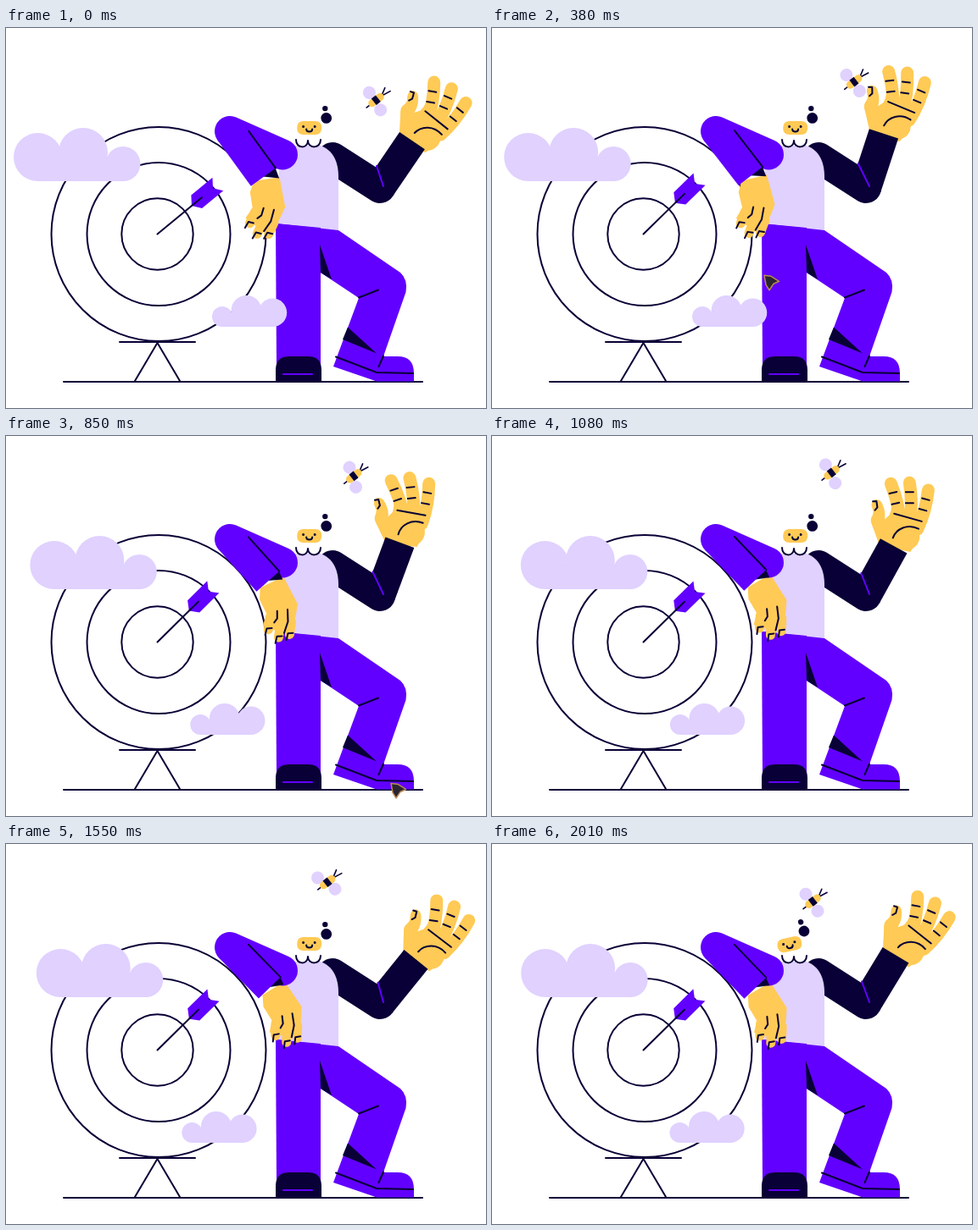
Animation, 566 px wide and 449 px high, one loop 2.08 s. Source, as an HTML page with a canvas:

```html
<!DOCTYPE html>
<html lang="en">
<head>
<meta charset="utf-8">
<title>Bullseye</title>
<style>
html, body { margin: 0; width: 100%; height: 100%; overflow: hidden; background: #fff; }
canvas { display: block; }
</style>
</head>
<body>
<canvas id="stage" width="566" height="449"></canvas>
<script>
const ctx = document.getElementById('stage').getContext('2d');
const INK = '#080036', VIOLET = '#6200ff', LILAC = '#e0d1ff', SKIN = '#ffca55', WHITE = '#fff';
const LOOP = 2080, STEP = 77.5, RAD = Math.PI / 180;

// Sine easing through turning points: time, value, time, value...
function sway(t, ...p) {
  let i = 0;
  while (i < p.length - 4 && t > p[i + 2]) i += 2;
  const u = Math.min(1, Math.max(0, (t - p[i]) / (p[i + 2] - p[i])));
  return p[i + 1] + (p[i + 3] - p[i + 1]) * (1 - Math.cos(Math.PI * u)) / 2;
}
// Parabola with its low point at t0 and its own strength on each side
function bow(t, t0, before, after) {
  const s = (t - t0) / 1000;
  return s * s * (s < 0 ? before : after);
}

function path(pts, close) {
  ctx.beginPath();
  for (let i = 0; i < pts.length; i += 2) ctx.lineTo(pts[i], pts[i + 1]);
  if (close) ctx.closePath();
}
function line(pts, color = INK, width = 2, cap = 'round') {
  path(pts);
  ctx.strokeStyle = color;
  ctx.lineWidth = width;
  ctx.lineCap = cap;
  ctx.lineJoin = 'round';
  ctx.stroke();
}
function poly(pts, color) {
  path(pts, true);
  ctx.fillStyle = color;
  ctx.fill();
}
function shape(d, fill, stroke, width = 2) {
  const p = new Path2D(d);
  if (fill) { ctx.fillStyle = fill; ctx.fill(p); }
  if (stroke) {
    ctx.strokeStyle = stroke;
    ctx.lineWidth = width;
    ctx.lineCap = ctx.lineJoin = 'round';
    ctx.stroke(p);
  }
}
function disc(x, y, r, fill, stroke) {
  ctx.beginPath();
  ctx.arc(x, y, r, 0, 7);
  if (fill) { ctx.fillStyle = fill; ctx.fill(); }
  if (stroke) { ctx.strokeStyle = stroke; ctx.lineWidth = 2; ctx.stroke(); }
}
// Draw in a frame moved to (x, y) and turned by deg
function at(x, y, deg, draw) {
  ctx.save();
  ctx.translate(x, y);
  ctx.rotate(deg * RAD);
  draw();
  ctx.restore();
}
// Turn around a pivot that may also move by itself
function hinge(px, py, x, y, deg, draw) {
  at(x, y, deg, () => { ctx.translate(-px, -py); draw(); });
}

function target(t) {
  disc(180, 243.5, 126.5, null, INK);
  disc(180, 243.5, 84.5, null, INK);
  disc(178.5, 243.5, 42.2, null, INK);
  line([134, 371, 223, 371]);
  line([152, 417, 178.5, 372, 205, 417]);
  line([68, 418, 491, 418]);
  // the arrow still quivers from the hit
  const turn = -44.6 + 5 * Math.exp(-t / 300) * Math.cos(2 * Math.PI * t / 500);
  at(178.5, 243.5, turn, () => {
    poly([92.6, -10, 85, 0, 92.6, 10, 60, 10, 52.5, 0, 60, -10], VIOLET);
    line([0, 0, 68, 0]);
  });
}

// Three puffs on a flat base; each puff is x, height of centre, radius
function cloud(x, y, ...puffs) {
  for (const [cx, h, r] of puffs) disc(x + cx, y - h, r, LILAC);
  const [a, , b] = puffs;
  ctx.fillRect(x + a[0], y - a[1], b[0] - a[0], a[1]);
}

function finger(x, y, lean) {
  at(x, y, lean, () => {
    shape('M0 0Q4 25 0 48', null, SKIN, 15);
    for (const d of [11, 24]) line([-4.5, d, 4.5, d]);
  });
}

function openHand() {
  poly([466, 98, 480, 101, 497, 96, 520, 114, 521, 124, 508, 139, 494, 148, 464, 126], SKIN);
  disc(497, 130, 15.5, SKIN);
  shape('M466 112V98Q466 94 470 91Q474 88 474 84Q474 75 481 74.5Q487.5 76 487 84Q487 94 481 102L484 120Z', SKIN);
  shape('M483 103Q496 95 498 82L510 100L490 118Z', SKIN);
  finger(506, 65, 11);
  finger(526.5, 73, 24);
  finger(543, 90, 39.5);
  line([478, 75.5, 482, 77, 480, 84, 476, 86]);
  line([495, 99, 521, 120.5]);
  shape('M482 124.5C490 116 505 116 514 127', null, INK);
}

function wavingArm(t) {
  const deg = sway(t, -126, 36, 457, 17.2, 640, 17, 1480, 38.8, 2300, 28);
  const palm = sway(t, -250, 3, 850, -29.5, 1650, -1);
  const x = 441 + 68 * Math.sin(deg * RAD), y = 189.5 - 68 * Math.cos(deg * RAD);
  hinge(479, 133.5, x, y, palm, openHand);
  line([385, 153, 441, 189], INK, 36);
  line([441, 189, x, y], INK, 36, 'butt');
  const bend = deg - 34;
  line([437 + bend * .33, 163 + bend * .17, 445, 187], VIOLET);
}

function legs() {
  poly([318, 231, 371, 236, 371, 400, 319, 400], VIOLET);
  shape('M318 231L392 239L465 289Q474 297 471.5 312L445 388H460Q481 387 481 408V417.5H437L386 400L416 319L371 289V257L350 250Z', VIOLET);
  poly([370, 256, 384, 297, 371, 289], INK);
  line([416, 318.5, 439, 309.5]);
  poly([403, 353.5, 397, 368, 437, 384.5], INK);
  line([389, 388.5, 437, 407, 480, 408]);
  line([445, 387.5, 439.5, 400]);
  shape('M318 418V404Q318 388 334 388H356Q372 388 372 404V418Z', INK);
  line([327, 409, 361, 409], VIOLET);
}

function restingHand() {
  poly([303, 178, 304, 192, 314, 208, 311, 222, 322, 226, 346, 226, 348.5, 205, 349, 192, 329, 162], SKIN);
  for (const [x, y] of [[316, 225], [329, 233], [341.5, 228]]) {
    line([x + 2, y + 1, x + 2.5, y - 14], SKIN, 11);
    line([x - 1, y + 8, x, y, x + 6, y - 1]);
  }
  line([326, 203, 327, 212, 324, 217]);
  line([338, 200, 340, 214, 337, 228]);
}

function restingArm(swing) {
  const deg = 54 - 8.4 * swing, a = deg * RAD;
  hinge(311.4, 169.5, 264 + 67 * Math.cos(a), 122 + 67 * Math.sin(a), 23 - 23.5 * swing, restingHand);
  line([264, 122, 326, 149.5], VIOLET, 36);
  at(264, 122, deg, () => {
    poly([66, 0, 66, -18, 79 - 3 * swing, -14.5], INK);
    poly([0, -18, 67, -18, 67, 18, 0, 18], VIOLET);
    line([13, -18, 67, -18]);
  });
}

function head(t) {
  shape('M342 132C342 143 356 143 356 133C356 143 371 143 371 132', WHITE, INK);
  hinge(357, 150, 357, 150, sway(t, 1560, .3, 2010, -12), () => {
    shape('M350.5 110H364.5Q372 110 372 118T364.5 126H350.5Q343 126 343 118T350.5 110Z', SKIN);
    disc(350.5, 116.5, 1.5, INK);
    disc(364, 116.5, 1.5, INK);
    shape('M354 119.5C354 123.5 361 123.5 361 119.5', null, INK);
    disc(377.5, 106.3, 6.4, INK);
    disc(376, 95, 3.2, INK);
  });
}

function bee(t) {
  const x = 436.5 - 58 * Math.min(1, Math.max(0, t) / 1560) ** 1.3;
  const y = 42 + bow(t, 1300, 25.5, 51);
  at(x - 1.5, y + 1.5, sway(t, 0, 57, 610, 48, 850, 72, 1550, 33, 2010, 55), () => {
    disc(-12.2, 0, 7.5, LILAC);
    disc(12.2, 0, 7.5, LILAC);
  });
  at(x, y, -38, () => {
    line([-14.5, 0, -8, 0], INK, 1.6);
    line([17, -5, 8, 0, 19.5, 2], INK, 1.6);
    line([-6, 0, 6, 0], SKIN, 9);
    poly([-3.5, -4.8, 3, -4.8, 3, 4.8, -3.5, 4.8], INK);
  });
}

function pointer(t) {
  if (t < 60 || t > 1000) return;
  at(289 + bow(t, 570, 882, 2130), 270 + bow(t, 570, 605, 1811), 0, () => {
    const edge = [1, 1, 9, 2, 18.5, 8, 12, 11, 7, 18.5, 3, 12];
    poly(edge, '#2a2430');
    line([...edge, 1, 1], '#b98a52', 1.5);
  });
}

function draw(t) {
  ctx.fillStyle = WHITE;
  ctx.fillRect(0, 0, 566, 449);
  const drift = sway(t, 0, 0, 1320, 27, 3000, 22);
  target(t);
  wavingArm(t);
  shape('M321 232L322 160L340 139H371C386 145 392 158 392 176V240Z', LILAC);
  legs();
  restingArm(drift / 27);
  head(t);
  bee(t);
  cloud(9 + drift, 181, [28.5, 28.5, 28.5], [82, 34, 29], [129, 20.5, 20.5]);
  cloud(243 - 1.33 * drift, 353, [12, 12, 12], [40.5, 19, 18], [71.5, 16.7, 16.7]);
  pointer(t);
}

const start = performance.now();
function tick() {
  const now = (performance.now() - start) % LOOP;
  const step = Math.min(26, Math.floor((now + 13) / STEP));
  draw(Math.max(0, step * STEP - 5));
  requestAnimationFrame(tick);
}
tick();
</script>
</body>
</html>
```
